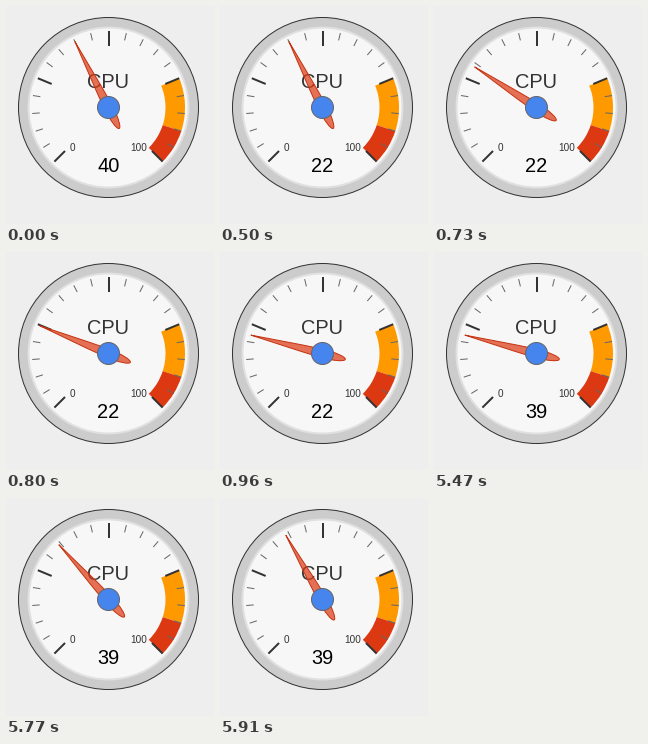
Recreate the animation shown at these times as a matplotlib script. Size 208 by 218 pixels, loop 8 s.

```python
import numpy as np
import matplotlib.pyplot as plt
from matplotlib.animation import FuncAnimation
from matplotlib.collections import LineCollection
from matplotlib.patches import Circle, PathPatch, Wedge
from matplotlib.path import Path

W, H, DPI = 208, 218, 100
CX, CY = 102.5, 101.5
LOOP, STEP = 8000, 20
PX = 72 / DPI  # one pixel in points

plt.rcParams["font.family"] = "Liberation Sans"
fig = plt.figure(figsize=(W / DPI, H / DPI), dpi=DPI, facecolor="#eeeeee")
ax = fig.add_axes([0, 0, 1, 1])
ax.set_xlim(0, W)
ax.set_ylim(H, 0)
ax.axis("off")


def angle(value):
    """Dial angle in radians, clockwise from the top."""
    return np.radians(-135 + 2.7 * value)


def polar(value, r):
    a = angle(value)
    return CX + r * np.sin(a), CY - r * np.cos(a)


def disc(r, fill, edge, width, z):
    ax.add_patch(Circle((CX, CY), r, fc=fill, ec=edge, lw=width * PX, zorder=z))


def band(start, end, color):
    a, b = np.degrees(angle(np.array([start, end]))) - 90
    ax.add_patch(Wedge((CX, CY), 76.5, a, b, width=19.5, fc=color, lw=0, zorder=2))


def ticks(values, inner, color, width):
    lines = [[polar(v, inner), polar(v, 76.5)] for v in values]
    ax.add_collection(LineCollection(lines, colors=color, linewidths=width * PX,
                                     capstyle="butt", zorder=3))


def label(x, y, text, size, color, align="center"):
    return ax.text(x, y, text, size=size * PX, color=color, ha=align,
                   va="baseline", zorder=4)


disc(90, "#cccccc", "#333333", 1, 0)
disc(80, "#f7f7f7", "#e0e0e0", 2, 1)
band(75, 90, "#ff9900")
band(90, 100, "#dc3912")
ticks([v for v in range(0, 101, 5) if v % 25], 69, "#666666", 1)
ticks(range(0, 101, 25), 61.5, "#333333", 2)
label(102.5, 82, "CPU", 20, "#333333")
label(64, 145, "0", 10, "#333333", "left")
label(141.5, 145, "100", 10, "#333333", "right")
reading = label(102.5, 166, "40", 20, "#000000")

# Needle outline as (distance along, distance aside), pointing up the dial
side = [(74, 0), (32, 2.6), (12, 3.9), (0, 4.3), (-12, 4.3), (-23.5, 2.6), (-23.5, 0)]
outline = np.array(side + [(u, -v) for u, v in side[-2::-1]])
codes = [Path.MOVETO] + [Path.CURVE4] * (len(outline) - 1)


def needle_path(value):
    a = angle(value)
    u, v = outline.T
    x = CX + u * np.sin(a) + v * np.cos(a)
    y = CY - u * np.cos(a) + v * np.sin(a)
    return Path(np.column_stack([x, y]), codes)


needle = PathPatch(needle_path(40), fc=(0.863, 0.224, 0.071, 0.7), ec="#c63310",
                   lw=PX, joinstyle="round", zorder=5)
ax.add_patch(needle)
disc(11, "#4684ee", "#666666", 1, 6)

# (redraw times, easing start, from, to)
MOVES = [
    ((500, 580, 650, 730, 800, 880, 960), 500, 40, 22),
    ((5470, 5530, 5610, 5670, 5750, 5830, 5910), 5487, 22, 39),
]


def state(t):
    value, shown = 40, 40
    for times, start, a, b in MOVES:
        passed = [s for s in times if s <= t]
        if passed:
            p = np.clip((passed[-1] - start) / 400, 0, 1)
            value, shown = a + (b - a) * p * p * (3 - 2 * p), b
    return value, shown


def update(k):
    value, shown = state(k * STEP + STEP / 2)
    needle.set_path(needle_path(value))
    reading.set_text(str(shown))
    return needle, reading


anim = FuncAnimation(fig, update, frames=LOOP // STEP, interval=STEP,
                     repeat=True, repeat_delay=0, blit=False)
plt.show()
```
